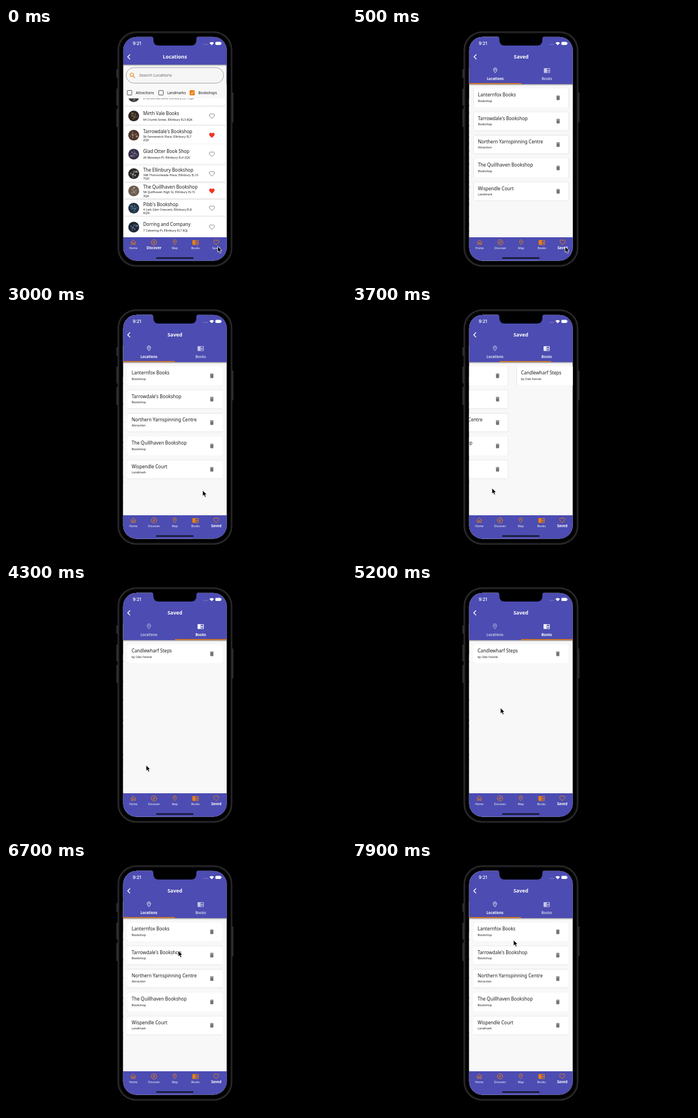
An HTML page for the animation above (8000 ms loop, 600 by 442 pixels).

```html
<!DOCTYPE html>
<html lang="en">
<head>
<meta charset="utf-8">
<title>Saved places</title>
<style>
  html, body { margin: 0; height: 100%; overflow: hidden; background: #000; }
  svg { display: block; width: 100vw; height: 100vh; }
  text { font-family: "Noto Sans", "Open Sans", sans-serif; }
  .card { fill: #fff; filter: drop-shadow(0 .9px .7px #0006); }
  .bar { fill: #4c4cb2; }
  .raised { filter: drop-shadow(0 1px 1.2px #0007); }
</style>
</head>
<body>
<svg id="stage" viewBox="0 0 600 442"></svg>
<script>
const LOOP = 8000, FRAME = 100;
const LEFT = 206.7, WIDTH = 183;
const ORANGE = '#e9800f', GREY = '#747474', INK = '#1d1d1f', PAGE = '#f8f8f8';

// Icons on a 24 unit grid
const HEART = 'M16.5 3.5C14.8 3.5 13 4.4 12 5.8 11 4.4 9.2 3.5 7.5 3.5 4.8 3.5 2.8 5.6 2.8 8.5c0 3.8 3.4 6.9 9.2 12 5.8-5.1 9.2-8.2 9.2-12 0-2.9-2-5-4.7-5z';
const line = d => `<path d="${d}" fill="none" stroke="currentColor" stroke-width="2"/>`;
const solid = d => `<path d="${d}" fill="currentColor" fill-rule="evenodd"/>`;
const ring = (x, y, r) => `<circle cx="${x}" cy="${y}" r="${r}" fill="none" stroke="currentColor" stroke-width="2"/>`;
const ICONS = {
  heart: line(HEART),
  loved: solid(HEART) + line(HEART),
  trash: solid('M6 19a2 2 0 0 0 2 2h8a2 2 0 0 0 2-2V7H6zM19 4h-3.5l-1-1h-5l-1 1H5v2h14z'),
  pin: line('M12 3C8.6 3 6 5.6 6 9c0 4.5 6 11.5 6 11.5S18 13.5 18 9c0-3.4-2.6-6-6-6z') + ring(12, 9, 1.5),
  home: line('M2.5 12.5 12 4l9.5 8.5M5.5 11v8.5h4.5v-6h4v6h4.5V11'),
  compass: ring(12, 12, 9.3) + line('M15.5 8.5l-5 2-2 5 5-2z'),
  book: solid('M13 12h7v1.5h-7zM13 9.5h7V11h-7zM13 14.5h7V16h-7zM21 4H3a2 2 0 0 0-2 2v13a2 2 0 0 0 2 2h18a2 2 0 0 0 2-2V6a2 2 0 0 0-2-2zM21 19h-9V6h9z'),
  search: ring(9.5, 9.5, 5.5) + line('M14 14l6 6'),
};
const icon = (name, x, y, color, size = 11) =>
  `<g color="${color}" transform="translate(${x - size / 2} ${y - size / 2}) scale(${size / 24})">${ICONS[name]}</g>`;

const text = (str, x, y, size, fill = INK, weight = 400, anchor = 'start') =>
  `<text x="${x}" y="${y}" font-size="${size}" fill="${fill}" font-weight="${weight}" text-anchor="${anchor}">${str}</text>`;
const rect = (x, y, w, h, attrs = '') => `<rect x="${x}" y="${y}" width="${w}" height="${h}" ${attrs}/>`;

function header(title, bottom) {
  return rect(LEFT - .5, 15, WIDTH + 1, bottom - 15, 'class="bar raised"') +
    '<path d="M219 46.8l-4.2 4.2 4.2 4.2" fill="none" stroke="#fff" stroke-width="1.4"/>' +
    text(title, 298, 54.4, 8.9, '#fff', 600, 'middle');
}

function navBar(selected) {
  const items = [['Home', 'home'], ['Discover', 'compass'], ['Map', 'pin'], ['Books', 'book'], ['Saved', 'heart']];
  return rect(LEFT - .5, 370, WIDTH + 1, 43, 'class="bar"') + items.map(([label, name], i) => {
    const x = 224.6 + i * 36.6, on = label === selected;
    return icon(name, x, 379, ORANGE, 12) +
      text(label, x, 391.3, on ? 6.2 : 5.2, '#fff', on ? 700 : 400, 'middle');
  }).join('');
}

// Discover page
const SHOPS = [
  // centre y, height, title, address lines, loved, photo tones
  [121, 30, '', ['8 Winterlow Lane, Ellinbury EL1 5QR'], 0, '#3b3a3c', '#77706b'],
  [155, 33, 'Mirth Vale Books', ['64 Crumb Street, Ellinbury EL3 8QK'], 0, '#302723', '#866a50'],
  [189, 30, "Tarrowdale's Bookshop", ['5b Fennerwick Place, Ellinbury EL7', '2QX'], 1, '#4b352b', '#a58a72'],
  [222.5, 33, 'Glad Otter Book Shop', ['26 Mosswyn Pl, Ellinbury EL4 2QV'], 0, '#393144', '#8a7ba5'],
  [257, 29.5, 'The Ellinbury Bookshop', ['348 Thornsmeade Place, Ellinbury EL10', '7QD'], 0, '#2c2a29', '#a7a099'],
  [287.5, 28, 'The Quillhaven Bookshop', ['58 Quillhaven High St, Ellinbury EL15', '3QA'], 1, '#6a5b50', '#a8957f'],
  [318, 29, "Pibb's Bookshop", ['4 Lark Glen Crescent, Ellinbury EL8', '6QN'], 0, '#243247', '#4c8091'],
  [351.5, 35, 'Dorring and Company', ['7 Calvering Pl, Ellinbury EL7 8QJ'], 0, '#1f2733', '#5c7795'],
];

// Round photo: a dark disc with a few lighter patches
function photo(y, dark, light) {
  const patches = Array.from({ length: 7 }, (_, i) => {
    const angle = i * 2.4 + y, r = 2.4 * Math.sqrt(i);
    return rect(224 + r * Math.cos(angle), y - 1.5 + r * Math.sin(angle), 2 + i % 3, 3, `fill="${light}" opacity="${.5 + i % 2 * .4}"`);
  });
  return `<circle cx="225.4" cy="${y}" r="9.6" fill="${dark}"/>` + patches.join('');
}

function shopRow([y, h, title, address, loved, dark, light]) {
  const wraps = address.length > 1;
  const first = title ? y + (wraps ? 4.8 : 8.7) : y + 5;
  return rect(209, y - h / 2, 178, h, 'class="card" rx="1.5"') + photo(y + .5, dark, light) +
    text(title, 242, y - (wraps ? 3.2 : 1.4), 8, INK, 500) +
    address.map((part, i) => text(part, 242, first + i * 6.6, 5.3)).join('') +
    (title ? icon(loved ? 'loved' : 'heart', 363.3, y + .7, loved ? '#ef3426' : GREY, 11.5) : '');
}

function checkbox(label, x, checked) {
  const box = checked
    ? rect(x, 110, 9, 9, `rx="1" fill="${ORANGE}"`) + `<path d="M${x + 1.8} 114.6l2 2 3.6-4" fill="none" stroke="#fff"/>`
    : rect(x + .5, 110.5, 8, 8, 'rx=".6" fill="none" stroke="#555"');
  return box + text(label, x + 15.5, 117, 6.3);
}

const discoverPage = rect(LEFT, 15, WIDTH, 397, `fill="${PAGE}"`) +
  `<g clip-path="url(#listArea)">${SHOPS.map(shopRow).join('')}</g>` +
  header('Locations', 64.8) +
  rect(212, 70, 172, 27.5, 'rx="13.7" fill="#f6f6f6" stroke="#808080" stroke-width=".7"') +
  icon('search', 223.5, 84, ORANGE, 13) + text('Search Locations', 235, 86.2, 7.3, '#666') +
  checkbox('Attractions', 213.5) + checkbox('Landmarks', 269) + checkbox('Bookshops', 324, true) +
  navBar('Discover');

// Saved page
const PLACES = [
  ['Lanternfox Books', 'Bookshop'],
  ["Tarrowdale's Bookshop", 'Bookshop'],
  ['Northern Yarnspinning Centre', 'Attraction'],
  ['The Quillhaven Bookshop', 'Bookshop'],
  ['Wispendle Court', 'Landmark'],
];
const savedCard = ([title, kind], i) => {
  const y = 107 + i * 41.3;
  return rect(214, y, 168, 33, 'class="card" rx="2"') + text(title, 221.7, y + 14.3, 8.1) +
    text(kind, 221.7, y + 23.8, 5.3) + icon('trash', 363.2, y + 16.4, GREY);
};
const tab = (id, name, label, x) =>
  `<g id="${id}">${icon(name, x, 75, '#fff', 12)}${text(label, x, 91.8, 6.2, '#fff', 600, 'middle')}</g>`;

const savedPage = rect(LEFT, 15, WIDTH, 397, `fill="${PAGE}"`) +
  `<g id="pager">${PLACES.map(savedCard).join('')}
   <g transform="translate(${WIDTH})">${savedCard(['Candlewharf Steps', 'by Odo Fennik'], 0)}</g></g>` +
  header('Saved', 99.2) + tab('placesTab', 'pin', 'Locations', 252.2) + tab('booksTab', 'book', 'Books', 343.5) +
  rect(LEFT, 97.5, WIDTH / 2, 1.7, `id="indicator" fill="${ORANGE}"`) + navBar('Saved');

const buttons = [[194.5, 73, 15], [194.5, 107, 30], [194.5, 143, 32], [398.5, 114, 53]]
  .map(([x, y, h]) => rect(x, y, 3, h, 'rx="1" fill="#29292b"')).join('');

const stage = document.getElementById('stage');
stage.innerHTML = `
  <defs>
    <clipPath id="screen">${rect(LEFT, 15.7, WIDTH, 395.8, 'rx="24"')}</clipPath>
    <clipPath id="listArea">${rect(LEFT, 124.5, WIDTH, 245.5)}</clipPath>
  </defs>
  ${buttons}
  ${rect(197.8, 7, 200.7, 414, 'rx="32" fill="#111" stroke="#363638" stroke-width="1.5"')}
  ${rect(201, 10, 194.5, 408, 'rx="29" fill="#000"')}
  <g clip-path="url(#screen)">
    <g id="discover">${discoverPage}</g>
    <g id="saved">${savedPage}</g>
    ${rect(265, 405.5, 66, 2.4, 'rx="1.2" fill="#151528"')}
  </g>
  <path d="M257 15q3 .5 3 4v2q0 10 10 10h56q10 0 10-10v-2q0-3.5 3-4z" fill="#000"/>
  <text x="223.8" y="30" font-size="7.3" font-weight="600" fill="#fff" style="font-family:Inter,sans-serif">9:21</text>
  <path d="M348.5 29h8" stroke="#a5a5dc" stroke-dasharray="1.2 1.1"/>
  <path d="M363 30.5l-4-4a5.7 5.7 0 0 1 8 0z" fill="#fff"/>
  ${rect(369.5, 24.5, 10, 5.4, 'rx="1.6" fill="#fff"')}
  <path d="M380.5 26v2.4" stroke="#c8c8ec" stroke-width=".8"/>
  <path id="cursor" d="M0 0V10.3L2.4 8.1 4.1 12 6 11.2 4.4 7.4H7.6Z" stroke="#fff" stroke-width=".8"/>`;

// Motion: time followed by values, eased between neighbours
const CURSOR = [
  [0, 373.5, 386], [500, 376, 386.5], [800, 376, 386.5], [1700, 299, 331], [2200, 340, 330],
  [2900, 340, 330], [3000, 347, 326], [3200, 357, 324], [3300, 357, 324], [3700, 247, 322],
  [4200, 247, 322], [4800, 250, 300], [5200, 262, 219], [5300, 262, 219], [5700, 358, 217],
  [6100, 358, 217], [6600, 346, 207], [6800, 262, 107], [6900, 262, 107], [7400, 252, 78],
  [7500, 252, 78], [7900, 285, 138],
];
const SWIPE = [
  [3300, 0], [3700, .581], [3800, .8], [3900, .92], [4000, .97], [4200, 1],
  [5300, 1], [5700, .475], [5800, .25], [5900, .1], [6000, .05], [6100, .022], [6300, 0],
];

function sample(keys, t) {
  const next = keys.findIndex(key => key[0] > t);
  if (next < 1) return keys.at(next).slice(1);
  const a = keys[next - 1], b = keys[next];
  const u = (t - a[0]) / (b[0] - a[0]), eased = u * u * (3 - 2 * u);
  return a.slice(1).map((value, i) => value + (b[i + 1] - value) * eased);
}

const [discover, saved, pager, indicator, placesTab, booksTab, cursor] =
  ['discover', 'saved', 'pager', 'indicator', 'placesTab', 'booksTab', 'cursor'].map(id => document.getElementById(id));
const move = (el, x, y = 0) => el.setAttribute('transform', `translate(${x} ${y})`);

function draw(t) {
  const u = Math.min(1, Math.max(0, (t - 50) / 500));
  const push = 1 - (1 - u) ** 2.5;
  move(discover, -WIDTH / 3 * push);
  move(saved, WIDTH * (1 - push));

  const [page] = sample(SWIPE, t);
  move(pager, -WIDTH * page);
  move(indicator, WIDTH / 2 * page);
  placesTab.setAttribute('opacity', 1 - .32 * page);
  booksTab.setAttribute('opacity', .68 + .32 * page);
  move(cursor, ...sample(CURSOR, t));
}

function tick() {
  const t = performance.now() % LOOP;
  draw(Math.floor(t / FRAME) * FRAME);
  requestAnimationFrame(tick);
}
tick();
</script>
</body>
</html>
```
